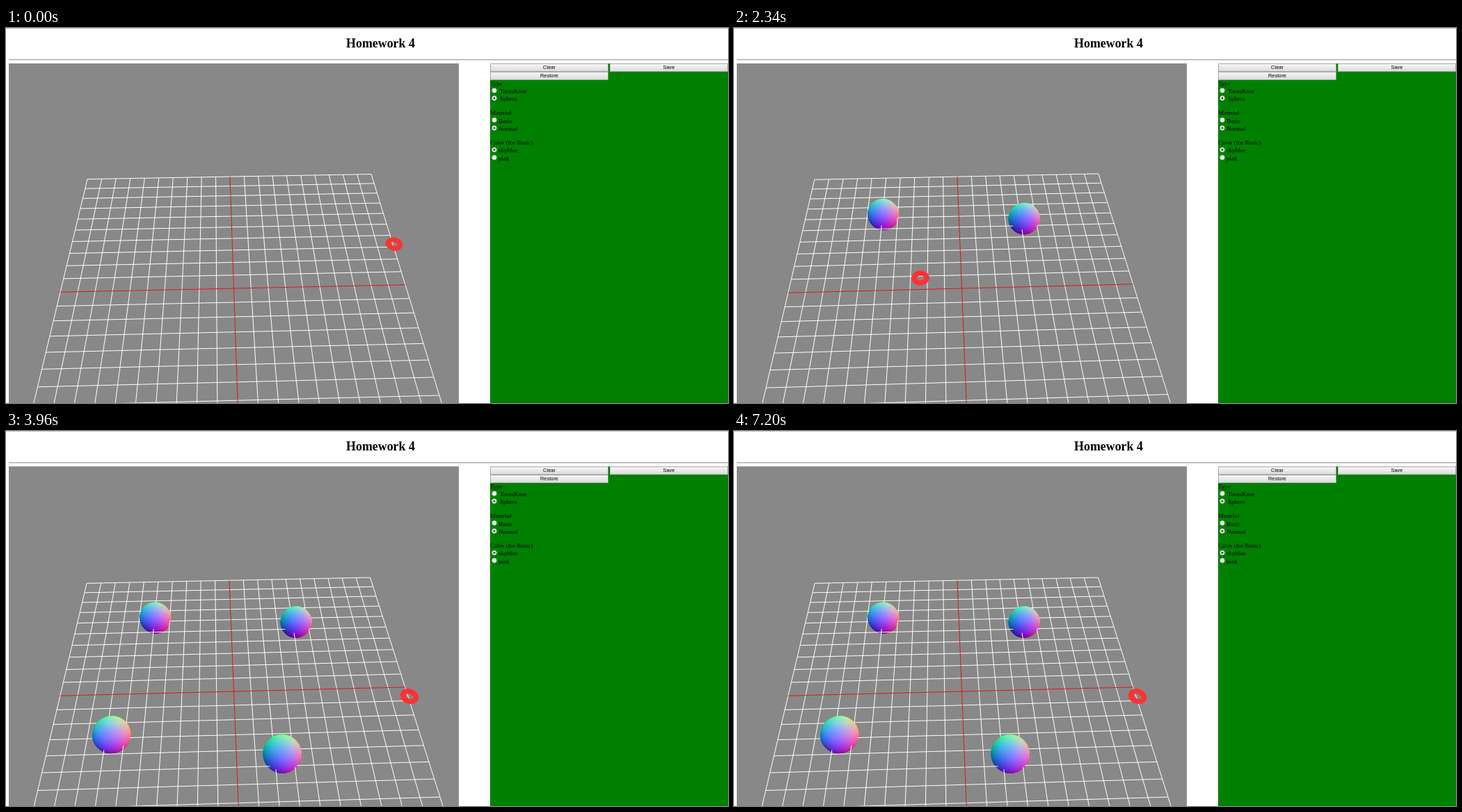
An HTML page with a canvas for the animation above (8 s loop, 1038 by 540 pixels).

```html
<!DOCTYPE html>
<html lang="en">
<head>
<meta charset="utf-8">
<title>Homework 4</title>
<style>
  html, body { margin: 0; width: 100%; height: 100%; overflow: hidden; background: #fff; }
  body { position: relative; }
  body > * { position: absolute; box-sizing: border-box; }
  #edge { left: 0; top: 0; width: 1038px; height: 1px; background: #c4c4c4; }
  h1 { margin: 0; left: 4px; top: 12px; width: 1069px; text-align: center;
       font: bold 17.9px/21px "Liberation Serif", Times, serif; color: #000; }
  #rule { left: 4px; top: 45px; width: 1034px; height: 2px; background: #a6a6a6; border-bottom: 1px solid #e4e4e4; }
  #view { left: 4px; top: 51px; }
  #panel { left: 696px; top: 51px; width: 342px; height: 489px; background: #008000; }
  .btn { height: 12px; width: 170px; border: 1px solid #a9a9a9; background: linear-gradient(#f6f6f6, #dcdcdc);
         font: 7.45px/10px "Liberation Sans", Arial, sans-serif; text-align: center; color: #000; }
  svg { left: 0; top: 0; font: 9px "Liberation Serif", Times, serif; }
</style>
</head>
<body>
<div id="edge"></div>
<h1>Homework 4</h1>
<div id="rule"></div>
<canvas id="view" width="647" height="489"></canvas>
<div id="panel"></div>
<div class="btn" style="left:696px;top:51px">Clear</div>
<div class="btn" style="left:868px;top:51px">Save</div>
<div class="btn" style="left:696px;top:63px">Restore</div>
<svg id="form" width="1038" height="540"></svg>
<script>
const { sin, cos, PI, floor, hypot } = Math;
const LOOP = 8000, STEP = 60;
const CX = 327.5, CY = 375, FOCAL = 707, DIST = 28.5;
const KNOT_FROM = 5160, KNOT_TO = 7200;
const ctx = document.getElementById('view').getContext('2d');
ctx.translate(-4, -51);
ctx.lineJoin = 'round';

// Form: baseline, text x, label, radio id
const rows = [
  [82.5, 696, 'Type'], [94, 710, 'TorusKnot', 'knot'], [105, 710, 'Sphere', 'sphere'],
  [125.3, 696, 'Material'], [136.5, 708, 'Basic', 'basic'], [148, 708, 'Normal', 'normal'],
  [168, 696, 'Color (for Basic)'], [179.3, 708, 'skyblue', 'skyblue'], [190.5, 708, 'pink', 'pink']
];
document.getElementById('form').innerHTML = rows.map(([y, x, label, id]) =>
  `<text x="${x}" y="${y}">${label}</text>` + (id ?
    `<circle cx="702" cy="${y - 4}" r="3.4" fill="#ededed" stroke="#9a9a9a" stroke-width=".5"/>
     <circle id="${id}" cx="702" cy="${y - 4}" r="1.5" fill="#444"/>` : '')).join('');
const check = (id, on) => document.getElementById(id).setAttribute('visibility', on ? 'visible' : 'hidden');
check('basic', false);
check('pink', false);

// Keyed values: [time, ...values], linear in between
const cameraKeys = [[1740, .0269, .909], [1920, .032, .909], [2580, .032, .909], [2760, .032, .9025]];
const ringKeys = [
  [480, 558, 311], [540, 540, 296], [660, 470, 255], [780, 400, 240], [900, 300, 240], [1020, 235, 258],
  [1080, 215, 268], [1320, 215, 268], [1380, 245, 270], [1560, 330, 285], [1740, 400, 278],
  [1800, 417, 275], [2160, 417, 275], [2220, 390, 290], [2340, 268, 360], [2460, 200, 405],
  [2580, 152, 437], [2940, 152, 437], [3000, 188, 426], [3240, 354.5, 451], [3360, 354.5, 451],
  [3420, 368, 450], [3600, 397, 465], [3840, 397, 465], [3900, 486, 425], [3960, 580, 382]
];
function track(keys, t) {
  const i = keys.findIndex(k => k[0] > t);
  if (i < 0) return keys[keys.length - 1].slice(1);
  if (i === 0) return keys[0].slice(1);
  const a = keys[i - 1], b = keys[i], f = (t - a[0]) / (b[0] - a[0]);
  return a.slice(1).map((v, j) => v + (b[j + 1] - v) * f);
}

// Orbit camera looking at the grid centre
let ca, sa, ce, se;
function aim([turn, lift]) {
  ca = cos(turn); sa = sin(turn); ce = cos(lift); se = sin(lift);
}
function toView([x, y, z]) {
  const zr = z * ca - x * sa;
  return [x * ca + z * sa, y * ce - zr * se, y * se + zr * ce];
}
function project(p) {
  const [x, y, z] = toView(p), s = FOCAL / (DIST - z);
  return [CX + x * s, CY - y * s, s];
}
function ground(sx, sy) {
  const dy = sy - CY, z = dy * DIST / (FOCAL * se + ce * dy);
  const x = (sx - CX) * (DIST - z * ce) / FOCAL;
  return [x * ca - z * sa, 0, x * sa + z * ca];
}

const add = (a, b, k = 1) => a.map((v, i) => v + b[i] * k);
const dot = (a, b) => a[0] * b[0] + a[1] * b[1] + a[2] * b[2];
const cross = (a, b) => [a[1] * b[2] - a[2] * b[1], a[2] * b[0] - a[0] * b[2], a[0] * b[1] - a[1] * b[0]];
const unit = a => a.map(v => v / hypot(...a));

function ball(u, v) {
  const n = [sin(v / 2) * cos(u), cos(v / 2), sin(v / 2) * sin(u)];
  return { p: n, n };
}
function knotLine(u) {
  const r = 1 + cos(1.5 * u) / 2;
  return [r * cos(u), r * sin(u), sin(1.5 * u) / 2];
}
function knot(u, v) {
  const w = 2 * u, c = knotLine(w), c2 = knotLine(w + .01);
  const t = add(c2, c, -1), b = unit(cross(t, add(c2, c))), m = unit(cross(b, t));
  const n = add(m.map(k => k * cos(v)), b, sin(v));
  return { p: add(c, n, .35), n };
}
function mesh(surface, nu, nv) {
  const at = (i, j) => surface(i / nu * 2 * PI, j / nv * 2 * PI);
  const quads = [];
  for (let i = 0; i < nu; i++) for (let j = 0; j < nv; j++) {
    quads.push({
      corners: [at(i, j), at(i + 1, j), at(i + 1, j + 1), at(i, j + 1)].map(q => q.p),
      mid: at(i + .5, j + .5)
    });
  }
  return quads;
}
const ballMesh = mesh(ball, 40, 28), knotMesh = mesh(knot, 180, 16);

aim(track(cameraKeys, LOOP));
const objects = [[1080, 214.8, 269.3], [1800, 417, 275.3], [2640, 152, 437.3], [3600, 397, 464.8]]
  .map(([from, x, y]) => ({ from, at: ground(x, y) }));

function line(a, b) {
  ctx.moveTo(...project(a).slice(0, 2));
  ctx.lineTo(...project(b).slice(0, 2));
}
function drawGrid() {
  for (const red of [false, true]) {
    ctx.beginPath();
    for (let i = -10; i <= 10; i++) if ((i === 0) === red) {
      line([-10, 0, i], [10, 0, i]);
      line([i, 0, -10], [i, 0, 10]);
    }
    ctx.lineWidth = 1;
    ctx.strokeStyle = red ? '#dc1818' : '#fff';
    ctx.stroke();
  }
}
function drawRing([x, y]) {
  const c = ground(x, y);
  ctx.beginPath();
  for (let i = 0; i < 40; i++) {
    const a = i / 20 * PI;
    ctx.lineTo(...project(add(c, [.37 * cos(a), 0, .37 * sin(a)])).slice(0, 2));
  }
  ctx.closePath();
  ctx.lineWidth = .3 * project(c)[2];
  ctx.strokeStyle = '#ff3232';
  ctx.stroke();
}
// Facing quads, far to near, coloured by their normal in view space
function facing(quads, at) {
  const out = [];
  for (const { corners, mid } of quads) {
    const p = toView(add(mid.p, at)), n = toView(mid.n);
    if (dot(n, [-p[0], -p[1], DIST - p[2]]) < -.5) continue;
    out.push({
      below: mid.p[1] < 0,
      depth: p[2],
      color: `rgb(${n.map(v => Math.round(v * 127.5 + 127.5))})`,
      points: corners.map(c => project(add(c, at)))
    });
  }
  return out.sort((a, b) => a.depth - b.depth);
}
function drawQuads(quads) {
  ctx.lineWidth = .6;
  for (const { color, points } of quads) {
    ctx.beginPath();
    points.forEach(([x, y]) => ctx.lineTo(x, y));
    ctx.closePath();
    ctx.fillStyle = ctx.strokeStyle = color;
    ctx.fill();
    ctx.stroke();
  }
}

function draw(t) {
  const knots = t >= KNOT_FROM && t < KNOT_TO;
  check('knot', knots);
  check('sphere', !knots);
  aim(track(cameraKeys, t));
  ctx.fillStyle = '#888';
  ctx.fillRect(4, 51, 647, 489);
  const quads = objects.filter(o => t >= o.from)
    .flatMap(o => facing(knots ? knotMesh : ballMesh, o.at));
  // The ground plane hides nothing, but its lines lie over whatever is below it
  drawQuads(quads.filter(q => q.below));
  drawGrid();
  drawRing(track(ringKeys, t));
  drawQuads(quads.filter(q => !q.below));
}

let last = -1;
function tick() {
  const t = floor(performance.now() % LOOP / STEP) * STEP;
  if (t !== last) draw(last = t);
  requestAnimationFrame(tick);
}
tick();
</script>
</body>
</html>
```
